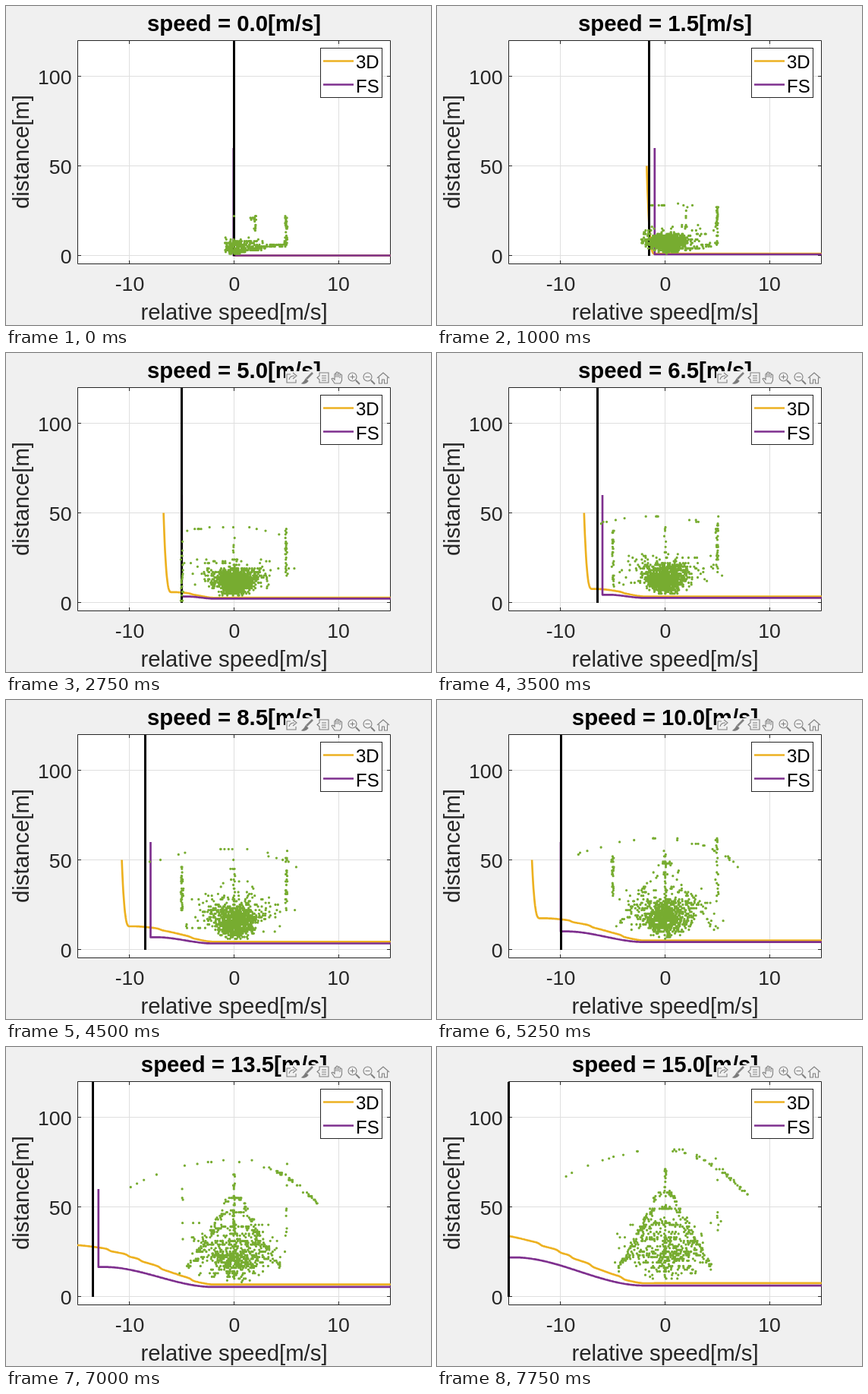
An HTML page for the animation above (8000 ms loop, 560 by 420 pixels).

```html
<!DOCTYPE html>
<html lang="en">
<head>
<meta charset="utf-8">
<title>Relative speed and distance</title>
<style>
html, body { margin: 0; width: 100%; height: 100%; overflow: hidden; background: #f0f0f0; }
svg { display: block; width: 560px; height: 420px; font-family: "Liberation Sans", Arial, sans-serif; }
text { fill: #262626; }
.label { font-size: 29.33px; text-anchor: middle; }
.title { font-weight: bold; fill: #000; }
.tick { font-size: 26.67px; }
.mid { text-anchor: middle; }
.end { text-anchor: end; }
.key text { font-size: 24px; fill: #000; }
.line { fill: none; stroke-width: 2.67; stroke-linejoin: round; }
.amber { stroke: #edb120; }
.violet { stroke: #7e2f8e; }
.ego { stroke: #000; stroke-width: 3; shape-rendering: crispEdges; }
.dots { fill: none; stroke: #77ac30; stroke-width: 3.3; stroke-linecap: round; }
.grid { stroke: #dfdfdf; }
.axes { fill: none; stroke: #262626; }
.icons { fill: none; stroke: #808080; stroke-width: 1.1; }
</style>
</head>
<body>
<svg viewBox="0 0 560 420">
  <defs><clipPath id="plot"><rect x="94" y="45" width="413" height="295"/></clipPath></defs>
  <rect width="560" height="420" fill="#f0f0f0"/>
  <rect x="94.5" y="45.5" width="412" height="294" fill="#fff"/>
  <path class="grid" d="M162.5 46V339M300.5 46V339M438.5 46V339M95 92.5H506M95 210.5H506M95 328.5H506"/>
  <path class="axes" d="M94.5 45.5H506.5V339.5H94.5ZM162.5 339v-4M300.5 339v-4M438.5 339v-4M162.5 46v4M300.5 46v4M438.5 46v4M95 92.5h4M95 210.5h4M95 328.5h4M506 92.5h-4M506 210.5h-4M506 328.5h-4"/>

  <g clip-path="url(#plot)">
    <path id="bound3d" class="line amber"/>
    <path id="boundFs" class="line violet"/>
  </g>
  <path id="ego" class="ego"/>
  <path id="dots" class="dots"/>

  <g class="tick">
    <text class="mid" x="163" y="375">-10</text>
    <text class="mid" x="301" y="375">0</text>
    <text class="mid" x="438" y="375">10</text>
    <text class="end" x="86.5" y="103">100</text>
    <text class="end" x="86.5" y="221">50</text>
    <text class="end" x="86.5" y="339">0</text>
  </g>
  <text class="label" x="300.5" y="413">relative speed[m/s]</text>
  <text class="label" transform="translate(30 192) rotate(-90)">distance[m]</text>
  <text id="title" class="label title" x="300.5" y="33"></text>

  <g class="key">
    <rect x="414.5" y="55.5" width="81" height="65" fill="#fff" stroke="#262626"/>
    <path class="line amber" d="M418 72.5h40"/>
    <path class="line violet" d="M418 103.5h40"/>
    <text x="461" y="82">3D</text>
    <text x="461" y="114">FS</text>
  </g>

  <g id="tools" class="icons">
    <rect x="368" y="24" width="138" height="18" fill="#f0f0f0" stroke="none"/>
    <path d="M375 28h-5v11h12v-4M373 35q1-5 7-5M378 26l5 4-5 4"/>
    <path d="M404 26l-8 8" stroke-width="2.6"/>
    <path d="M395 34l3 3q-3 4-8 3q3-2 5-6z" fill="#777"/>
    <path d="M413 26h12v13h-12v-4l-3-2.5 3-2.5zM416 30h6M416 33h6M416 36h6"/>
    <path d="M433 40l-4-6q1-2 4 1v-7q1-2 2 0v4v-6q1-2 2.5 0v6v-5q1-2 2.5 0v6v-4q1-2 2.5 0v7l-2 4z"/>
    <path d="M461 36l5 5M481 36l5 5" stroke-width="2"/>
    <circle cx="456.5" cy="31.5" r="5.5"/>
    <circle cx="476.5" cy="31.5" r="5.5"/>
    <path d="M453.5 31.5h6M456.5 28.5v6M473.5 31.5h6"/>
    <path d="M489 33l8-7 8 7M491.5 32v8h4v-5h3v5h4v-8"/>
  </g>
</svg>
<script>
const $ = id => document.getElementById(id);
const LOOP = 8000, STEP = 250, TOP_SPEED = 15;
const px = x => (300.5 + 13.75 * x).toFixed(1);
const py = d => (328.5 - 2.36 * d).toFixed(1);
const polyline = pts => "M" + pts.map(([x, d]) => px(x) + " " + py(d)).join("L");
const clamp = u => Math.min(1, Math.max(0, u));
const smooth = u => { u = clamp(u); return u * u * (3 - 2 * u); };

// Braking distance that falls to a constant gap
function fsCurve(v) {
  const n = Math.floor(v), gap = n ? .25 + .39 * n : 0;
  const rise = 15.7 * (n / TOP_SPEED) ** 2.4, x0 = n ? -n : -.05;
  const pts = [[x0, 60]];
  for (let x = x0; x < 0; x += .1)
    pts.push([x, gap + rise * smooth((-x - 2) / Math.max(.5, n - 2.6))]);
  pts.push([0, gap], [15, gap]);
  return polyline(pts);
}

// Small steps along the slope
function ripple(x, q) {
  let sum = 0;
  for (const s of [4.1, 7.1, 9, 10.2, 12])
    if (s < .76 * q) sum += Math.tanh((-x - s) * 4) * Math.exp(-Math.abs(x + s) * 1.3);
  return sum * .04 * q;
}

function curve3d(v) {
  const q = Math.floor(v * 1.2 + 1e-6), gap = v ? .25 + .48 * v : 0;
  const rise = .086 * q * q, pts = [];
  const height = x => gap + rise * smooth(Math.max(0, (-x - 2) / Math.max(.5, q - 2.2)) ** .8) + ripple(x, q);
  const top = height(-q);
  for (let t = 0; q && t < 1; t += .05)
    pts.push([-q - .76 * (1 - t), top + (50 - top) * (1 - t) ** 3]);
  for (let x = -q; x < 0; x += .1) pts.push([x, height(x)]);
  pts.push([0, gap], [15, gap]);
  return polyline(pts);
}

function random(seed) {
  return () => {
    seed = seed + 0x6d2b79f5 | 0;
    let t = Math.imul(seed ^ seed >>> 15, 1 | seed);
    t = t + Math.imul(t ^ t >>> 7, 61 | t) ^ t;
    return ((t ^ t >>> 14) >>> 0) / 4294967296;
  };
}

// Radar echoes: a cloud that climbs with speed and resolves into arches
function dotPath(v) {
  const rnd = random(Math.round(v * 20) + 7);
  const bell = () => (rnd() + rnd() + rnd() + rnd() - 2) * 1.7;
  const u = v / TOP_SPEED;
  const calm = clamp(1 - v / 3), order = smooth((v - 7) / 8);
  const low = 1 + .5 * v, high = 10 + 2 * v, top = 22 + 4 * v;
  let path = "";

  const dot = (x, d) => {
    if (x > -v - .9) path += `M${px(x)} ${py(Math.max(1, Math.round(d)))}h0`;
  };
  const repeat = (n, place) => {
    for (let i = 0; i < Math.round(n); i++) place(rnd());
  };
  const column = (n, x, from, to) =>
    repeat(n, t => dot(x + bell() * .06, from + (to - from) * t));

  const crowd = 230 + 800 * Math.sin(Math.PI * u ** .6);
  repeat(crowd, () => {
    const h = (rnd() + rnd()) / 2;
    dot(.1 + bell() * (1.1 + .5 * order) * (.55 + .75 * h), low + (high - low) * h);
  });
  repeat(110 * (1 - calm), t => dot(bell() * 2.3, low + 4 + (high - low) * t));
  repeat(150 * calm, t => dot(5 * t * t + bell() * .2, 2 + 4.5 * t * t + bell() * .5));

  column(16 * calm, 2, 14, top);
  column(45 * clamp(v / 8 - .4), 0, low, .9 * top);
  column(32 * (1 - .8 * order), 5, 5 + 2 * v, top);
  column(40 * clamp(1 - Math.abs(v - 8) / 6), -5, 6 * (v - 5), .85 * top);

  // Far rim
  repeat(9, t => {
    const x = -Math.min(10, v) * t;
    dot(x, top * (1 - .002 * x * x));
  });
  repeat(4 + 40 * order, t => {
    const x = Math.min(8, 2 + v / 2) * Math.sqrt(t);
    dot(x, top * (1 - .005 * x * x) + bell() * .6);
  });

  // Nested arches
  for (let i = 0; i < 5; i++) {
    const h = (24 + 8.5 * i) * (.5 + .5 * u), w = 4.4 - .75 * i;
    repeat((80 - 9 * i) * order, t => {
      const a = Math.PI * (t - .5);
      dot(w * Math.sin(a) + bell() * .1, h * (.6 + .4 * Math.sqrt(Math.cos(a))) + bell() * .5);
    });
  }
  return path;
}

let shown = -1;
function draw() {
  const t = performance.now() % LOOP;
  const k = Math.max(0, Math.floor(t / STEP) - 1);
  if (k !== shown) {
    shown = k;
    const v = k / 2;
    $("title").textContent = `speed = ${v.toFixed(1)}[m/s]`;
    $("bound3d").setAttribute("d", curve3d(v));
    $("boundFs").setAttribute("d", fsCurve(v));
    $("ego").setAttribute("d", `M${px(-v)} 45.5V328.5`);
    $("dots").setAttribute("d", dotPath(v));
    $("tools").style.display = v < 5 ? "none" : "";
  }
  requestAnimationFrame(draw);
}
draw();
</script>
</body>
</html>
```
